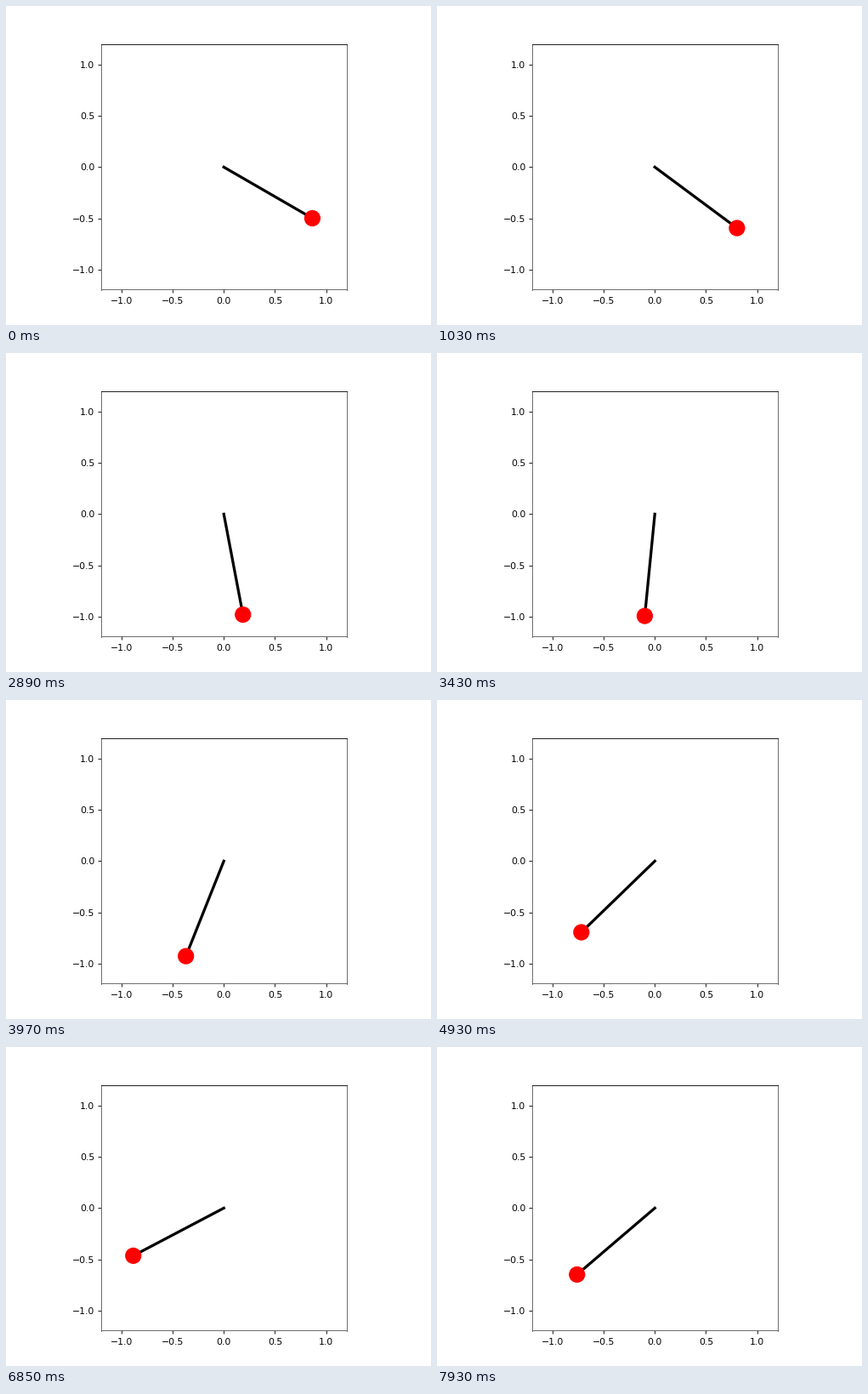
Recreate the animation shown at these times as a matplotlib script. Size 500x375 px, loop 7990 ms.

```python
import numpy as np
import matplotlib.pyplot as plt
from matplotlib.animation import FuncAnimation

WIDTH, HEIGHT, DPI = 500, 375, 78.125
LOOP_MS = 7990
FRAMES = 133

LENGTH, GRAVITY = 1.0, 9.81
START = np.radians(60)
BOB_RADIUS = 0.08
DT = 0.01


def swing(steps):
    """Pendulum angles by forward Euler, so the swing slowly widens."""
    angle, speed = START, 0.0
    angles = []
    for _ in range(steps):
        angles.append(angle)
        accel = -GRAVITY / LENGTH * np.sin(angle)
        angle, speed = angle + speed * DT, speed + accel * DT
    return angles


def position(angle):
    return LENGTH * np.sin(angle), -LENGTH * np.cos(angle)


angles = swing(FRAMES)

fig, ax = plt.subplots(figsize=(WIDTH / DPI, HEIGHT / DPI), dpi=DPI)
ax.set_aspect("equal")
ax.set_xlim(-1.2 * LENGTH, 1.2 * LENGTH)
ax.set_ylim(-1.2 * LENGTH, 1.2 * LENGTH)
ax.spines["bottom"].set_position(("outward", -0.5))
ax.spines[["left", "right", "bottom"]].set_color("0.35")
ax.tick_params(axis="x", pad=5)
ticks = np.arange(-1, 1.1, 0.5)
ax.set_xticks(ticks)
ax.set_yticks(ticks)

x0, y0 = position(START)
rod, = ax.plot([0, x0], [0, y0], lw=3, c="k")
bob = ax.add_patch(plt.Circle((x0, y0), BOB_RADIUS, fc="r", zorder=3))


def animate(i):
    x, y = position(angles[i])
    rod.set_data([0, x], [0, y])
    bob.set_center((x, y))
    return rod, bob


anim = FuncAnimation(fig, animate, frames=FRAMES, interval=LOOP_MS / FRAMES,
                     repeat=True, repeat_delay=0)
plt.show()
```
